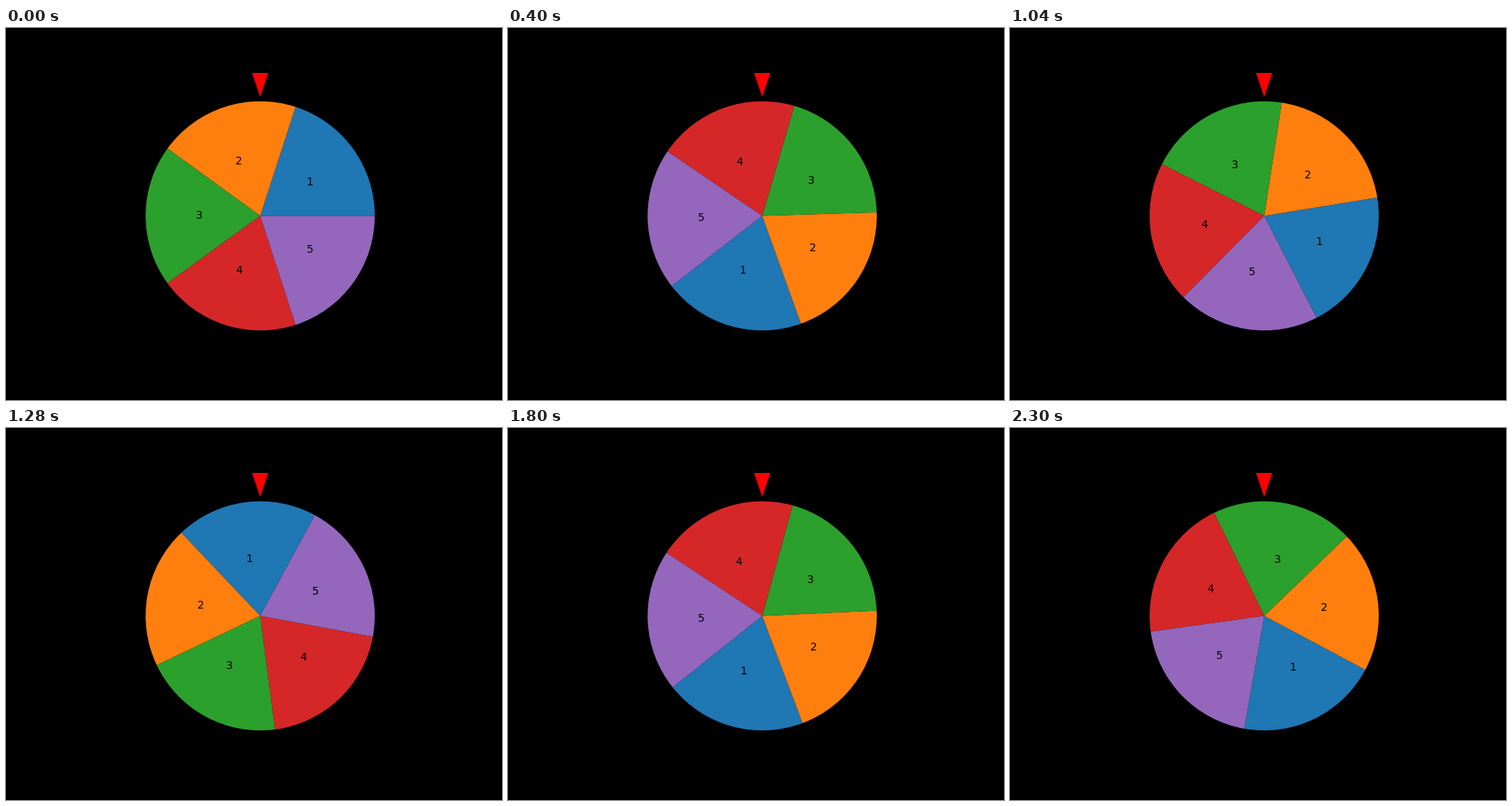
These frames come from a looping animation (640x480 px, 2320 ms). A matplotlib script:

```python
import matplotlib.pyplot as plt
from matplotlib.animation import FuncAnimation

FRAMES = 116
SLICES = 5


def wheel_angle(frame):
    """Nearly steady spin, then a braked phase that eases out."""
    spin = 29.4 * frame - 0.0256 * frame ** 2
    brake = 1700.4 - 1337 * (1 - frame / 120) ** 2.5
    return min(spin, brake) % 360


fig = plt.figure(figsize=(6.4, 4.8), dpi=100, facecolor="black")
ax = fig.add_subplot()


def draw(frame):
    ax.clear()
    ax.pie([1] * SLICES,
           labels=[str(n + 1) for n in range(SLICES)],
           colors=[f"C{n}" for n in range(SLICES)],
           labeldistance=0.5,
           startangle=wheel_angle(frame),
           textprops={"fontsize": 10, "color": "black",
                      "family": "DejaVu Sans"})
    # Pointer above the wheel
    ax.fill([-0.0715, 0.0715, 0], [1.25, 1.25, 1.038], color="red", lw=0)
    ax.set(xlim=(-1.25, 1.25), ylim=(-1.25, 1.25))
    return ax.patches + ax.texts


anim = FuncAnimation(fig, draw, frames=FRAMES, init_func=lambda: draw(0),
                     interval=20, repeat=True, repeat_delay=0)
plt.show()
```
